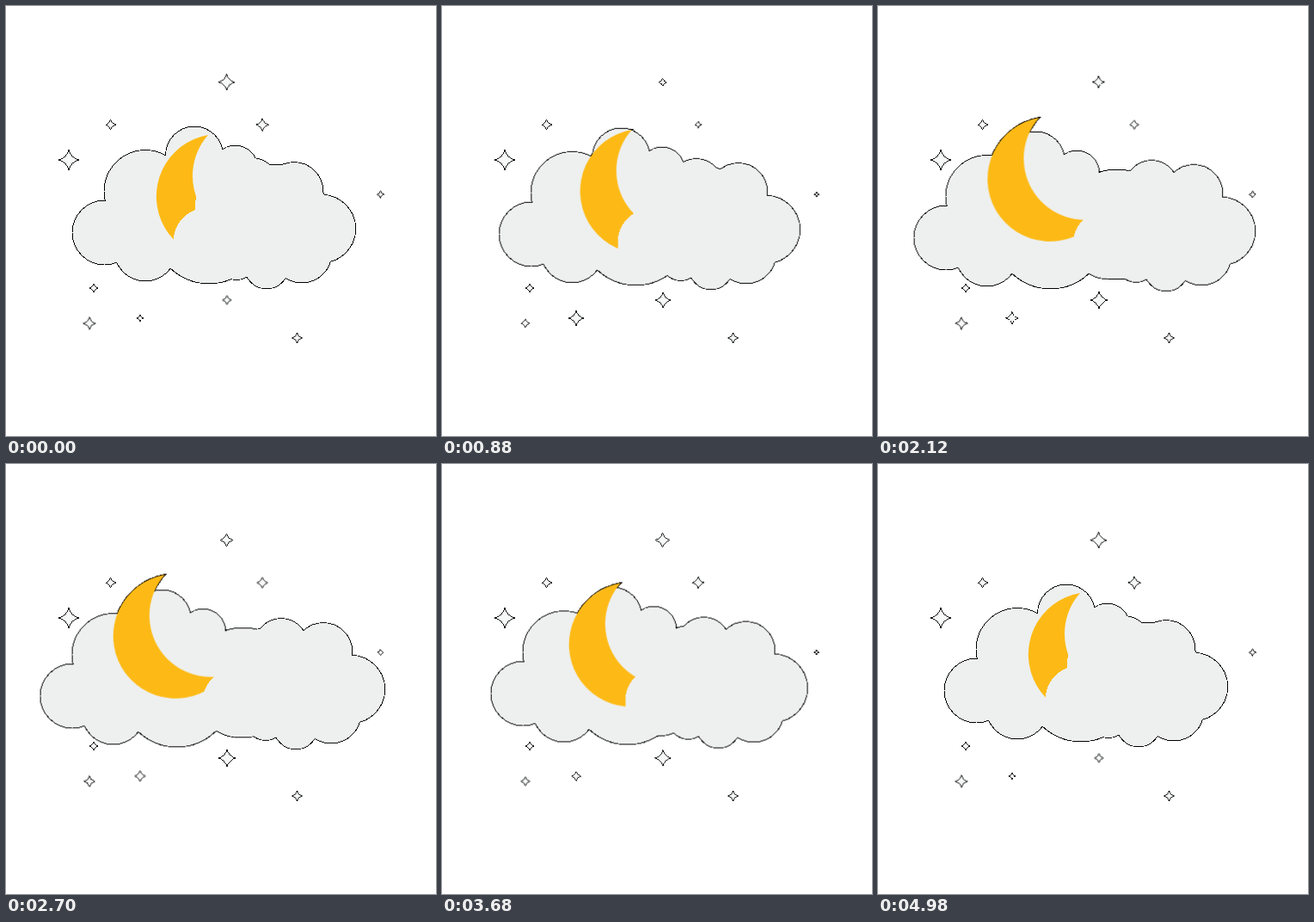
Animation of 500 by 500 pixels, one loop 5120 ms. Source, as an HTML page:

```html
<!DOCTYPE html>
<html lang="en">
<head>
<meta charset="utf-8">
<title>Moon and clouds</title>
<style>
  html, body { margin: 0; width: 100%; height: 100%; overflow: hidden; background: #fff; }
  svg { display: block; width: 100%; height: 100%; }

  .left, .moon, .right { animation: drift 5120ms cubic-bezier(.333, 0, .667, 1) infinite; }
  .left  { --x: -38px; --y: 6.4px; }
  .moon  { --x: -51px; --y: -21.7px; }
  .right { --x: 34.5px; --y: 2.9px; }
  @keyframes drift {
    0%, 96.6%, 100% { transform: translate(0, 0); }
    49.3% { transform: translate(var(--x), var(--y)); }
  }

  .cloud { fill: #eef0ef; shape-rendering: crispEdges; }
  .crescent { fill: #fdba16; }
  .edge { fill: #000; stroke: #000; stroke-width: 1.7; shape-rendering: crispEdges; }

  #star {
    fill: #f7f8f8; stroke: #000; stroke-width: .9;
    vector-effect: non-scaling-stroke; shape-rendering: crispEdges;
  }
  .dip   { animation: dip 5120ms linear infinite; }
  .pulse { animation: pulse 5120ms linear infinite; }
  .flare { animation: flare 5120ms linear infinite; }
  .swell { animation: swell 5120ms ease-out infinite; }
  @keyframes dip {
    0%, 28%, 82%, 100% { transform: scale(1); }
    17% { transform: scale(.5); }
    41% { transform: scale(.75); }
  }
  @keyframes pulse {
    0%, 40%, 97%, 100% { transform: scale(1); }
    17%, 70% { transform: scale(.7); }
  }
  @keyframes flare {
    0%, 97%, 100% { transform: scale(.45); }
    17% { transform: scale(1); }
  }
  @keyframes swell {
    0%, 97%, 100% { transform: scale(.53); }
    28% { transform: scale(1); }
    62% { transform: scale(1); animation-timing-function: ease-in; }
  }
</style>
</head>
<body>
<svg viewBox="0 0 500 500">
  <defs>
    <path id="star" d="M0-1Q.2-.2 1 0Q.2 .2 0 1Q-.2 .2-1 0Q-.2-.2 0-1Z"/>
    <path id="crescent" d="M235 150A72.5 72.5 0 1 0 303.4 267.4A71.5 71.5 0 0 1 235 150Z"/>
    <g id="left">
      <circle cx="114.5" cy="263.5" r="37"/>
      <circle cx="162" cy="215.5" r="47.5"/>
      <circle cx="219" cy="173.5" r="33"/>
      <circle cx="266.5" cy="188.5" r="26"/>
      <circle cx="162" cy="283.5" r="36"/>
      <circle cx="236" cy="258" r="64.5"/>
      <circle cx="313" cy="248" r="63.5"/>
    </g>
    <g id="right">
      <circle cx="367" cy="259" r="39.3"/>
      <circle cx="344" cy="287" r="34.5"/>
      <circle cx="303" cy="303" r="25.5"/>
      <circle cx="268" cy="294" r="24"/>
      <circle cx="234.5" cy="274.3" r="40"/>
      <circle cx="266" cy="235.3" r="46.5"/>
      <circle cx="286" cy="207.3" r="30.3"/>
      <circle cx="335" cy="215.3" r="33.3"/>
      <circle cx="303" cy="257" r="52"/>
    </g>
  </defs>

  <g transform="translate(256.5 88.5) scale(9.4)"><use class="dip" href="#star"/></g>
  <g transform="translate(298 138) scale(7.6)"><use class="dip" href="#star"/></g>
  <g transform="translate(435.5 219) scale(4.2)"><use class="pulse" href="#star"/></g>
  <g transform="translate(97 369) scale(7.3)"><use class="pulse" href="#star"/></g>
  <g transform="translate(156 363) scale(9)"><use class="flare" href="#star"/></g>
  <g transform="translate(257 342) scale(10)"><use class="swell" href="#star"/></g>
  <g transform="translate(121.5 138) scale(6)"><use href="#star"/></g>
  <g transform="translate(73 179) scale(12)"><use href="#star"/></g>
  <g transform="translate(102 328) scale(5)"><use href="#star"/></g>
  <g transform="translate(338.5 386) scale(6)"><use href="#star"/></g>

  <!-- dark silhouettes below, so only the joint outline shows -->
  <g class="edge">
    <use class="left" href="#left"/>
    <use class="moon" href="#crescent"/>
    <use class="right" href="#right"/>
  </g>
  <use class="left cloud" href="#left"/>
  <use class="moon crescent" href="#crescent"/>
  <use class="right cloud" href="#right"/>
</svg>
</body>
</html>
```
